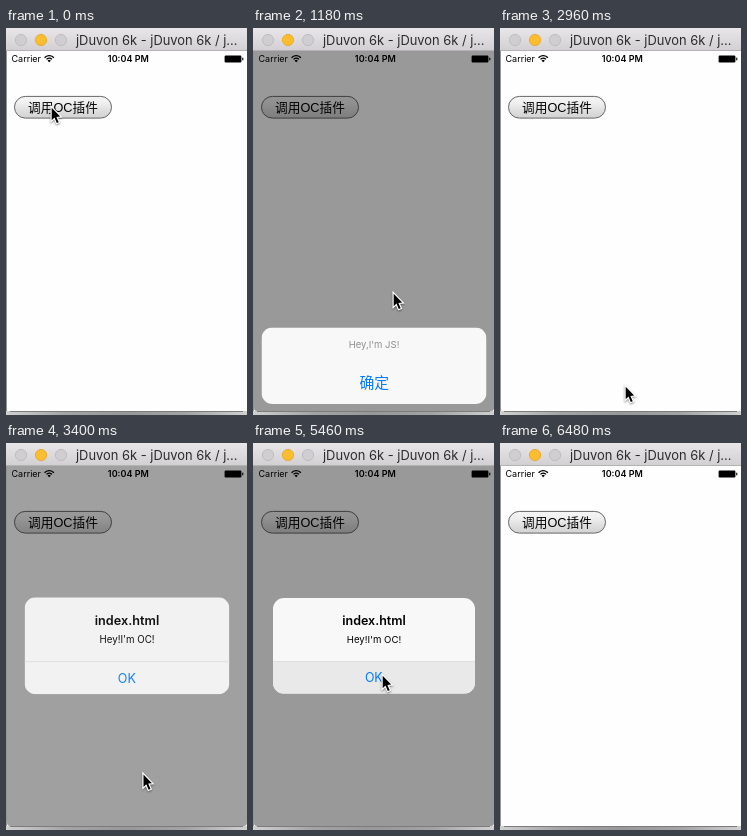
An HTML page with a canvas that plays this animation: 241x387 px, repeating every 7330 ms.

```html
<!DOCTYPE html>
<html lang="zh">
<head>
<meta charset="utf-8">
<title>Plugin call demo</title>
<style>
html, body { margin: 0; width: 100%; height: 100%; overflow: hidden; background: #fff; }
canvas { display: block; width: 241px; height: 387px; }
</style>
</head>
<body>
<canvas id="stage"></canvas>
<script>
const W = 241, H = 387, LOOP = 7330, TICK = 147.27;
const SANS = 'Inter, "Noto Sans CJK SC", "Noto Sans CJK", sans-serif';
const CJK = '"Liberation Sans", "Noto Sans CJK SC", "Noto Sans CJK", sans-serif';
const BLUE = '#007aff';

const canvas = document.getElementById('stage');
const ctx = canvas.getContext('2d');
const ratio = window.devicePixelRatio || 1;
canvas.width = W * ratio;
canvas.height = H * ratio;

// Pointer stops: time, x, y
const path = [
  [700, 45, 79], [1180, 140, 265], [1630, 155, 358], [2060, 125, 358],
  [3200, 125, 358], [3800, 176, 240], [4270, 161.5, 159],
  [4600, 138, 200], [4860, 110, 228], [5150, 129, 232],
  [5650, 129, 232], [6050, 172, 305], [6440, 214, 388]
];

const clamp = v => Math.min(1, Math.max(0, v));
const span = (t, start, length) => clamp((t - start) / length);
const smooth = p => p * p * (3 - 2 * p);
const easeOut = p => 1 - (1 - p) ** 3;

function pointerAt(t) {
  const next = path.findIndex(k => k[0] > t);
  if (next === 0) return path[0].slice(1);
  if (next < 0) return path[path.length - 1].slice(1);
  const [t0, x0, y0] = path[next - 1], [t1, x1, y1] = path[next];
  const p = smooth((t - t0) / (t1 - t0));
  return [x0 + (x1 - x0) * p, y0 + (y1 - y0) * p];
}

function rect(x, y, w, h, fill) {
  ctx.fillStyle = fill;
  ctx.fillRect(x, y, w, h);
}

function round(x, y, w, h, r) {
  ctx.beginPath();
  ctx.roundRect(x, y, w, h, r);
}

function text(str, x, y, size, color, align = 'center', weight = 400, family = SANS) {
  ctx.font = `${weight} ${size}px ${family}`;
  ctx.textAlign = align;
  ctx.fillStyle = color;
  ctx.fillText(str, x, y);
}

function blend(x0, y0, x1, y1, ...colors) {
  const g = ctx.createLinearGradient(x0, y0, x1, y1);
  colors.forEach((c, i) => g.addColorStop(i / (colors.length - 1), c));
  return g;
}

function light(x, fill, edge) {
  ctx.beginPath();
  ctx.arc(x, 12, 5.6, 0, 7);
  ctx.fillStyle = fill;
  ctx.fill();
  ctx.strokeStyle = edge;
  ctx.lineWidth = 0.9;
  ctx.stroke();
}

function drawWindow() {
  rect(0, 0, W, 22, blend(0, 0, 0, 22, '#e9e6e9', '#d3d0d3'));
  rect(0, 22, W, 1, '#b4b2b4');
  light(15, '#d0ced0', '#bcbabc');
  light(35, '#fdbd2e', '#e6a72c');
  light(55, '#d0ced0', '#bcbabc');
  text('jDuvon 6k - jDuvon 6k / j...', 70, 17, 12.9, '#2c2c2c', 'left');
}

// Window edge and the shadow below it, lighter towards the corners
function drawFrame() {
  rect(0, 23, 1, 360, '#959595');
  rect(0, 383, W, 4, blend(0, 0, W, 0, '#d0d0d0', '#a4a4a4', '#989898', '#a4a4a4', '#d0d0d0'));
  rect(4, 383, W - 8, 1, '#7c7c7c');
}

function drawStatus() {
  text('Carrier', 5.5, 34, 9, '#000', 'left');
  text('10:04 PM', 122.3, 34, 9, '#000', 'center', 600);
  ctx.strokeStyle = '#000';
  ctx.lineWidth = 1.3;
  for (const r of [3.6, 6.2]) {
    ctx.beginPath();
    ctx.arc(43.2, 33.8, r, -Math.PI * 0.77, -Math.PI * 0.23);
    ctx.stroke();
  }
  ctx.beginPath();
  ctx.moveTo(43.2, 34.2);
  ctx.arc(43.2, 34.2, 2.2, -Math.PI * 0.77, -Math.PI * 0.23);
  ctx.fillStyle = '#000';
  ctx.fill();
  round(218.6, 27.6, 16.8, 6.8, 1.2);
  ctx.fill();
  rect(236.2, 29.7, 1.1, 2.6, '#000');
}

function drawPage() {
  rect(1, 23, W, 360, '#fefefe');
  drawStatus();
  round(8.5, 68.4, 97, 21.7, 10.8);
  ctx.fillStyle = blend(0, 68, 0, 90, '#f6f6f6', '#efefef', '#dedede', '#d2d2d2');
  ctx.fill();
  ctx.strokeStyle = '#666';
  ctx.lineWidth = 1;
  ctx.stroke();
  text('调用OC插件', 57, 84, 12.7, '#000', 'center', 400, CJK);
}

// Translucent panel whose lower row can be pressed
function panel(x, y, w, h, r, split, pressed) {
  ctx.save();
  round(x, y, w, h, r);
  ctx.clip();
  rect(x, y, w, h, '#f8f8f8');
  if (pressed) rect(x, split, w, y + h - split, '#e9e9e9');
  ctx.restore();
}

function drawSheet(shown, pressed) {
  ctx.save();
  ctx.translate(0, 84 * (1 - shown));
  panel(8.5, 299.5, 225, 76.5, 11, 333, pressed);
  text("Hey,I'm JS!", 121, 319.7, 9.5, '#8f8f8f');
  text('确定', 121.3, 360.3, 14.8, BLUE, 'center', 400, CJK);
  ctx.restore();
}

function drawAlert(alpha, scale, pressed) {
  ctx.save();
  ctx.globalAlpha = alpha;
  ctx.translate(121, 203);
  ctx.scale(scale, scale);
  ctx.translate(-121, -203);
  panel(20, 155, 202, 95.7, 11, 218, pressed);
  rect(20, 218, 202, 1, '#dedede');
  text('index.html', 121, 182, 12.5, '#000', 'center', 600);
  text("Hey!I'm OC!", 121, 200, 9.6, '#000');
  text('OK', 120.8, 239.3, 12.4, BLUE);
  ctx.restore();
}

function drawPointer(x, y) {
  ctx.save();
  ctx.translate(x, y);
  ctx.beginPath();
  ctx.moveTo(0.7, 0.7);
  for (const [px, py] of [[0.7, 13.2], [3.5, 10.6], [5.8, 16], [7.7, 15.2], [5.4, 9.9], [9.2, 9.6]])
    ctx.lineTo(px, py);
  ctx.closePath();
  ctx.save();
  ctx.shadowColor = 'rgba(0,0,0,0.45)';
  ctx.shadowBlur = 2 * ratio;
  ctx.shadowOffsetY = ratio;
  ctx.strokeStyle = '#fff';
  ctx.lineWidth = 2.4;
  ctx.stroke();
  ctx.restore();
  ctx.fillStyle = '#000';
  ctx.fill();
  ctx.restore();
}

function draw(time) {
  const t = Math.floor((time % LOOP + 1) / TICK) * TICK;
  const sheet = easeOut(span(t, 440, 360)) * (1 - smooth(span(t, 2650, 295)));
  const entering = easeOut(span(t, 3150, 400));
  const alert = entering * (1 - smooth(span(t, 5500, 350)));

  ctx.setTransform(ratio, 0, 0, ratio, 0, 0);
  drawWindow();
  drawFrame();
  ctx.save();
  round(1, 23, W - 1, 360, [0, 0, 4, 4]);
  ctx.clip();
  drawPage();
  rect(1, 23, W, 360, `rgba(0,0,0,${0.4 * Math.max(sheet, alert)})`);
  if (sheet > 0) drawSheet(sheet, t > 2500);
  if (alert > 0) drawAlert(alert, 1.2 - 0.2 * entering, t > 5440);
  ctx.restore();
  if (t < 6440) drawPointer(...pointerAt(t));
}

const start = performance.now();
function loop() {
  draw(performance.now() - start);
  requestAnimationFrame(loop);
}
loop();
</script>
</body>
</html>
```
